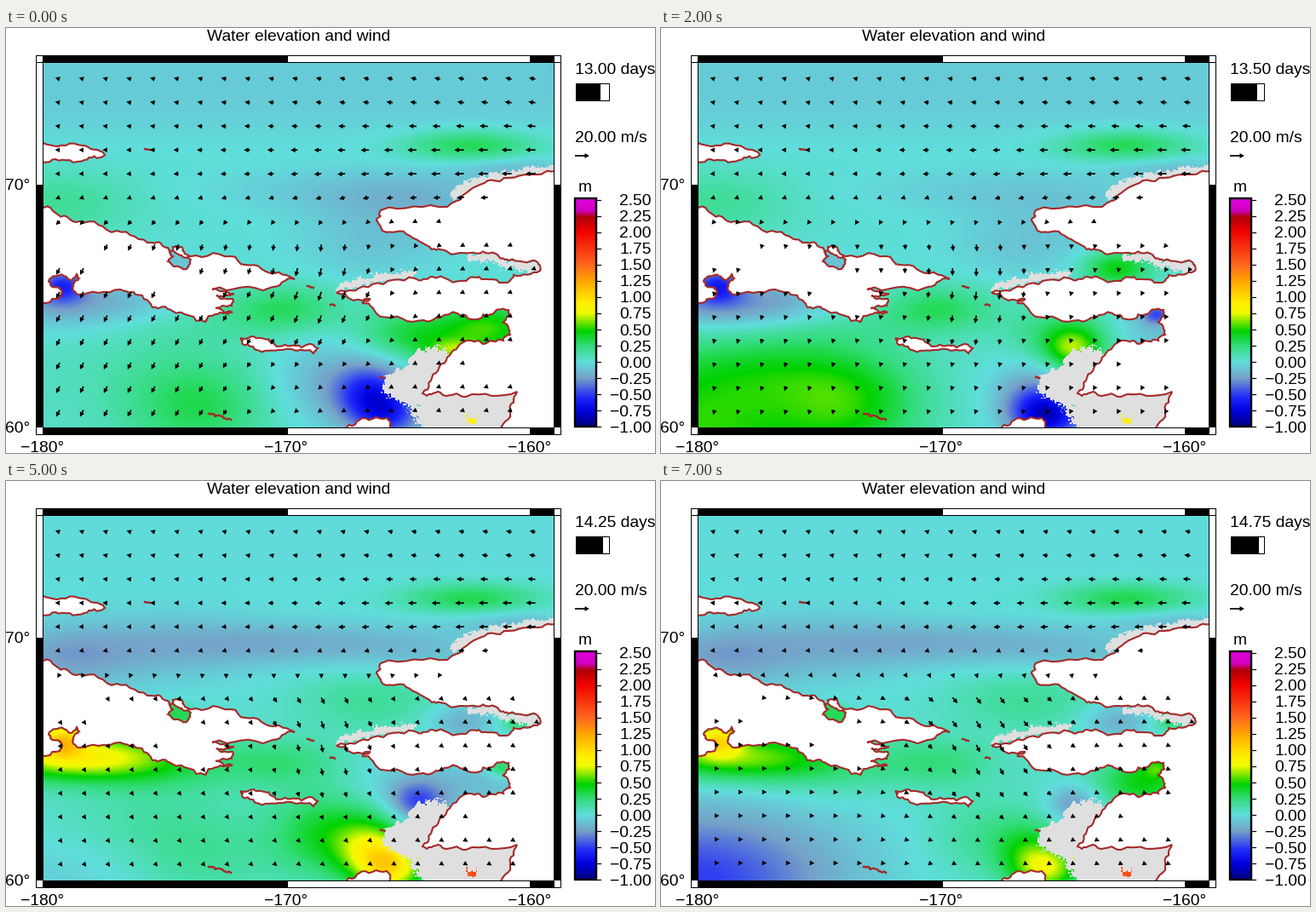
Animation of 762 by 499 pixels, one loop 8000 ms. Source, as a matplotlib script:

```python
import numpy as np
import matplotlib.pyplot as plt
from matplotlib.animation import FuncAnimation
from matplotlib.collections import PolyCollection
from matplotlib.colors import LinearSegmentedColormap, Normalize
from matplotlib.patches import Polygon, Rectangle
from matplotlib.path import Path

W, H, DPI = 762, 499, 100
FRAMES, INTERVAL = 8, 1000
LEFT, RIGHT, TOP, BOTTOM = 42, 643, 39, 469
BROWN, GREY = "#a52a2a", (0.875, 0.875, 0.875, 1)
PX = 72 / DPI
rng = np.random.default_rng(4)

plt.rcParams["font.family"] = "Liberation Sans"
plt.rcParams["font.size"] = 19.3 * PX

STOPS = [(-1, "#000078"), (-0.75, "#0000e0"), (-0.55, "#1e28fa"),
         (-0.25, "#76a0c8"), (0, "#60dedc"), (0.25, "#32dc78"),
         (0.47, "#00d200"), (0.75, "#f0fa00"), (0.9, "#ffee00"),
         (1.2, "#ffb000"), (1.5, "#ff641e"), (2, "#f00000"),
         (2.22, "#b00008"), (2.32, "#d000c0"), (2.5, "#e000e0")]
CMAP = LinearSegmentedColormap.from_list(
    "level", [((v + 1) / 3.5, c) for v, c in STOPS], N=700)
NORM = Normalize(-1, 2.5)

# ---- key points of the coasts, in stage pixels ----
ISLAND_NW = [(30, 141), (50, 137), (90, 138), (116, 149), (92, 155), (58, 154),
             (30, 156)]
ISLAND_S = [(275, 364), (300, 364), (315, 371), (340, 373), (366, 376),
            (361, 382), (320, 378), (290, 374), (278, 371)]
CAPE_S = [(400, 480), (403, 466), (414, 461), (447, 458), (455, 480)]
LAGOON = [(192, 263), (197, 268), (190, 274), (197, 280), (212, 283),
          (216, 277), (214, 268), (203, 266)]
WEST_NORTH = [(30, 208), (58, 217), (86, 227), (130, 238), (172, 252), (190, 258),
              (193, 265), (196, 257), (206, 257), (210, 265), (264, 268),
              (300, 283), (339, 295), (310, 305), (242, 307)]
WEST_SOUTH = [(268, 312), (247, 314), (266, 318), (265, 326), (246, 329),
              (266, 334), (238, 338), (234, 345), (195, 332), (172, 328),
              (160, 314), (140, 309), (90, 313), (80, 309), (79, 301), (86, 294),
              (83, 289), (76, 296), (68, 291), (50, 297), (53, 303), (63, 305),
              (66, 311), (63, 317), (30, 324)]
NORTH_CAPE = [(655, 171), (625, 172), (580, 180), (545, 190), (528, 203),
              (518, 210), (440, 214), (435, 226), (440, 234), (470, 242),
              (500, 260), (520, 264)]
SOUND = [(545, 264), (575, 265), (590, 273), (624, 275), (627, 285), (596, 290),
         (588, 299), (555, 292), (540, 297), (500, 292)]
PENINSULA = [(480, 294), (430, 301), (388, 311), (402, 317), (428, 318),
             (418, 323), (440, 339), (490, 343), (530, 335), (546, 342),
             (575, 332), (590, 331)]
SOUTH_BAY = [(591, 338), (583, 345), (592, 360), (584, 367), (560, 371),
             (545, 367), (523, 381), (505, 405), (489, 429), (510, 428),
             (540, 433), (600, 427), (592, 452), (577, 480), (655, 480)]
DELTA = [(524, 381), (505, 375), (485, 377), (468, 397), (444, 412), (441, 426),
         (468, 441), (492, 475), (610, 475), (605, 425), (500, 425)]
SPECKS = [[(163, 142), (169, 143)], [(354, 303), (361, 305)],
          [(381, 325), (386, 326)], [(440, 410), (444, 411)],
          [(238, 453), (246, 456), (254, 456), (264, 460)]]


def rough(points, steps=3, amount=0.22, reach=14):
    """Roughen a line by pushing out the middle of every segment."""
    p = np.array(points, float)
    for _ in range(steps):
        d = np.diff(p, axis=0)
        size = np.hypot(*d.T)[:, None] + 1e-6
        push = rng.uniform(-amount, amount, size.shape) * np.minimum(1, reach / size)
        out = np.empty((2 * len(p) - 1, 2))
        out[::2] = p
        out[1::2] = (p[:-1] + p[1:]) / 2 + push * np.c_[-d[:, 1], d[:, 0]]
        p = out
    return p


def shore_band(coast, dx, dy):
    """Strip between a coast and its shifted copy."""
    return coast + [(x + dx, y + dy) for x, y in coast[::-1]]


def gauss(x, y, cx, cy, sx, sy):
    return np.exp(-((x - cx) / sx) ** 2 / 2 - ((y - cy) / sy) ** 2 / 2)


def ramp(x, edge, width):
    """Smooth step from 0 to 1 around an edge."""
    return 1 / (1 + np.exp((edge - x) / width))


def blocks(size):
    """Blocky noise over the map, from -1 to 1."""
    cells = rng.uniform(-1, 1, (430 // size + 1, 600 // size + 1))
    return np.kron(cells, np.ones((size, size)))[:BOTTOM - TOP, :RIGHT - LEFT]


def tide(mean, half=0, cos=0, sin=0):
    """Half-daily and daily waves, one frame being a quarter of a day."""
    day = np.arange(FRAMES) * np.pi / 2
    return mean + half * np.cos(2 * day) + cos * np.cos(day) + sin * np.sin(day)


# ---- water level: blobs that rise and fall with the tide ----
gx, gy = np.meshgrid(np.arange(LEFT, RIGHT) + 0.5, np.arange(TOP, BOTTOM) + 0.5)
levels = 0.02 + tide(-.065, -.03)[:, None, None] * ramp(-gy, -125, 14)


def swell(cx, cy, sx, sy, *wave):
    levels[:] += tide(*wave)[:, None, None] * gauss(gx, gy, cx, cy, sx, sy)


# open sea in the north
swell(545, 138, 55, 13, .32)
swell(600, 165, 50, 10, -.14)
swell(480, 200, 85, 24, -.14, 0, -.04)
swell(330, 190, 90, 18, -.12, .05)
swell(190, 195, 80, 30, -.08, .09)
swell(65, 205, 60, 26, -.04, .19)
swell(430, 255, 65, 28, .02, -.14)
# strait and western gulf
swell(325, 330, 48, 20, .24, .04)
swell(200, 345, 65, 22, .1)
swell(90, 324, 85, 20, .2, -.5, .05, .1)
swell(66, 302, 20, 14, .1, -.58)
swell(203, 275, 12, 9, .08, -.2)
# southwest
swell(42, 470, 110, 60, -.02, .28, -.23, .22)
swell(140, 400, 90, 30, .09, .04, -.08, .05)
swell(225, 445, 60, 40, .19, .13, -.03, .09)
# river mouth
swell(375, 415, 45, 35, .08, -.17, -.09, .12)
swell(430, 432, 30, 26, 0, -.42, -.17, .12)
swell(455, 455, 28, 20, .05, -.6, .2, .05)
# eastern sounds
swell(480, 360, 45, 22, .13, .19, .02, -.1)
swell(484, 378, 22, 16, -.06, .29, -.22, -.05)
swell(525, 379, 22, 9, .1, .1, .2)
swell(568, 353, 38, 22, .15, 0, .32, -.27)
swell(582, 336, 12, 8, .05, -.25, .2, .05)
swell(535, 282, 28, 15, 0, .22, -.22)
swell(598, 282, 14, 8, .12, -.12)

# ---- dry flats with a few wet spots ----
fine, coarse = blocks(2), blocks(5)
jx, jy = gx + 3 * coarse + 2 * fine, gy + 3 * coarse[::-1] - 2 * fine
spots = np.c_[jx.ravel(), jy.ravel()]
dry = np.zeros(gx.shape, bool)
for flat in (shore_band(NORTH_CAPE[:5], -5, -10), shore_band(SOUND[:5], -6, 9),
             shore_band(PENINSULA[:3], 4, -11), DELTA):
    dry |= Path(flat).contains_points(spots).reshape(gx.shape)

creek = gauss(gx, gy, 546, 459, 5, 6) + 0.35 * coarse + 0.2 * fine > 0.75
pools = gauss(gx, gy, 485, 448, 18, 5) + 0.5 * coarse + 0.3 * fine > 1.15
creek_level, pool_level = tide(1.25, -.35), tide(.5, -.2)


def sea(k):
    z = levels[k].copy()
    z[creek], z[pools] = creek_level[k], pool_level[k]
    rgba = CMAP(NORM(z))
    rgba[dry & ~creek & ~pools] = GREY
    return rgba


# ---- stage ----
fig = plt.figure(figsize=(W / DPI, H / DPI), dpi=DPI, facecolor="white")
ax = fig.add_axes([0, 0, 1, 1])
ax.axis("off")
window = Rectangle((LEFT, TOP), RIGHT - LEFT, BOTTOM - TOP, transform=ax.transData)


def box(x0, y0, x1, y1, face="none", width=1):
    return ax.add_patch(Rectangle((x0, y0), x1 - x0, y1 - y0, fc=face, ec="black",
                                  lw=width * PX, zorder=5))


def land(points):
    patch = Polygon(rough(points + points[:1]), fc="white", ec=BROWN,
                    lw=2.1 * PX, zorder=2)
    ax.add_patch(patch)
    patch.set_clip_path(window)
    return patch


water = ax.imshow(sea(0), extent=(LEFT, RIGHT, BOTTOM, TOP),
                  interpolation="nearest", aspect="auto", zorder=1)
coasts = [ISLAND_NW, ISLAND_S, CAPE_S, WEST_NORTH + WEST_SOUTH,
          NORTH_CAPE + SOUND + PENINSULA + SOUTH_BAY]
for coast in coasts:
    land(coast)
lagoon = land(LAGOON)
for speck in SPECKS:
    ax.plot(*rough(speck).T, color=BROWN, lw=2.4 * PX, zorder=3)

# ---- wind ----
cols, rows = np.meshgrid(np.arange(21), np.arange(15))
tx, ty = (63 + 27.93 * cols).ravel(), (60 + 27.75 * rows).ravel()


def on_land(x, y):
    p = np.c_[x, y]
    return (x > RIGHT) | np.any([Path(c).contains_points(p) for c in coasts], axis=0)


# arrows stand only at sea and near the coast
ring = np.arange(8) * np.pi / 4
inland = np.all([on_land(tx + 20 * np.cos(a), ty + 20 * np.sin(a)) for a in ring],
                axis=0)
tx, ty = tx[~inland], ty[~inland]


def wind(k):
    s = k / (FRAMES - 1)
    x, y = (tx - LEFT) / 600, (ty - TOP) / 429
    north = ramp(-y, -0.43, 0.04)
    east = (1 - north) * ramp(x, 0.42, 0.06)
    west = 1 - north - east
    strait = gauss(x, y, 0.56, 0.64, 0.09, 0.13)
    middle = gauss(x, y, 0.5, 0.5, 0.2, 0.06)
    jet = gauss(x, y, 0.9, 0.28, 0.3, 0.09)
    u = (-north * (5 - s + 2.5 * x + 5 * jet) + west * (8 * s - 4)
         + east * (8 * s - 3) - 0.8 * strait + 3 * middle)
    v = (north * (6 * y - 1.8 + 2 * jet * (1 - x)) + west * (8 - 8 * s)
         + east * (1 + s) + (9 - 2 * s) * strait + 2 * middle)
    return u, v


def arrow(x, y, u, v):
    size = max(np.hypot(u, v), 0.1)
    c, s = u / size, v / size
    size = max(size, 5.5)
    neck, head, shaft = size - 5.5, 2.9, 0.85
    shape = [(0, shaft), (neck, shaft), (neck, head), (size, 0),
             (neck, -head), (neck, -shaft), (0, -shaft)]
    return [(x + a * c - b * s, y + a * s + b * c) for a, b in shape]


def arrows(k):
    return [arrow(*a) for a in zip(tx, ty, *wind(k))]


vanes = PolyCollection(arrows(0), fc="black", ec="none", zorder=4)
ax.add_collection(vanes)

# ---- map frame, changing colour every ten degrees ----
box(34.5, 31.5, 650.5, 476.5)
for a, b, tone in ((42, 329, "black"), (329, 614, "white"), (614, 642, "black")):
    for y in (31.5, 468.5):
        box(a + .5, y, b + .5, y + 8, tone)
for a, b, tone in ((39, 183, "white"), (183, 468, "black")):
    for x in (34.5, 642.5):
        box(x, a + .5, x + 8, b + .5, tone)

ax.text(343.5, 15, "Water elevation and wind", ha="center")
for i in range(3):
    ax.text(43 + 285.6 * i, 498, f"\u2212{180 - 10 * i}\u00b0", ha="center")
for y, lat in ((190, 70), (475, 60)):
    ax.text(28, y, f"{lat}\u00b0", ha="right")

# ---- clock, wind key and colour scale ----
clock = ax.text(667.5, 54, "")
box(668.5, 64.5, 707.5, 84.5)
bar = box(668.5, 64.5, 697.5, 84.5, "black")
ax.text(667.5, 134, "20.00 m/s")
ax.add_patch(Polygon(arrow(668, 150, 17, 0), fc="black", ec="none"))
ax.text(672, 192, "m")
ax.imshow(np.linspace(2.5, -1, 268)[:, None], cmap=CMAP, norm=NORM, aspect="auto",
          extent=(667, 693, 469, 200), zorder=1)
box(667.5, 200, 692.5, 468.5, width=2.4)
for i in range(15):
    value, y = 2.5 - i / 4, 201.5 + i * 19.07
    ax.plot([693, 698], [y, y], color="black", lw=1.2 * PX)
    ax.text(757.5, y + 6.5, f"{value:.2f}".replace("-", "\u2212"), ha="right")

ax.set_xlim(0, W)
ax.set_ylim(H, 0)


def update(k):
    days = 13 + k / 4
    water.set_data(sea(k))
    lagoon.set_facecolor(CMAP(NORM(levels[k, 275 - TOP, 203 - LEFT])))
    vanes.set_verts(arrows(k))
    clock.set_text(f"{days:.2f} days")
    bar.set_width(39 * days / 17.5)
    return water, lagoon, vanes, clock, bar


anim = FuncAnimation(fig, update, frames=FRAMES, interval=INTERVAL,
                     repeat=True, repeat_delay=0, blit=False)
plt.show()
```
